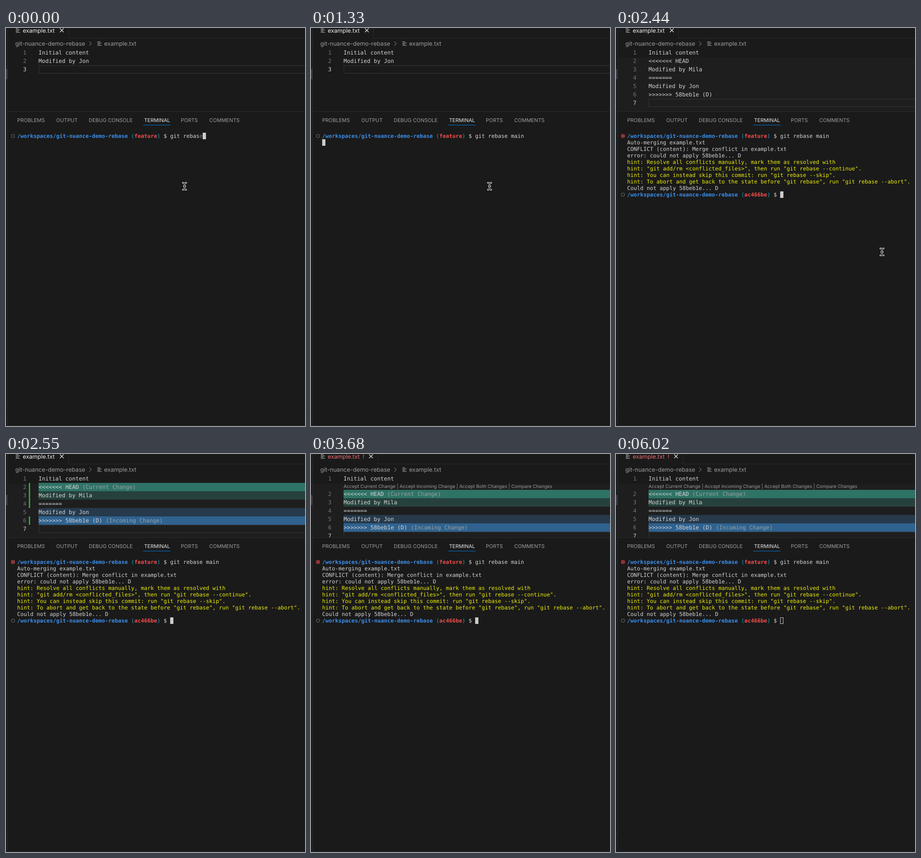
Write an HTML page with a canvas that moves like this. It is 643 px wide and 855 px high and loops after 6.25 s.

```html
<!DOCTYPE html>
<html lang="en">
<head>
<meta charset="utf-8">
<title>Rebase conflict</title>
<style>
html, body { margin: 0; width: 100%; height: 100%; overflow: hidden; background: #1a1a1a; }
canvas { display: block; }
</style>
</head>
<body>
<canvas id="stage" width="643" height="855"></canvas>
<script>
const ctx = document.getElementById('stage').getContext('2d');
const LOOP = 6250, W = 643, H = 855;
const MONO = '"DejaVu Sans Mono", monospace';
const SANS = 'Inter, sans-serif';
const TERM = '11.63px ' + MONO, TERM_BOLD = 'bold ' + TERM, CODE = '12px ' + MONO;
const COL = 7, ROW = 14, TERM_X = 24, TERM_Y = 225;
const INK = '#d4d4d4', MUTED = '#9d9d9d', EDGE = '#2b2b2b', YELLOW = '#ebeb0c', RED = '#f14c4c';

// Moments at which the screen changes, in ms
const AT = {
  enter: 1330, output: 1630, prompt: 1690, conflict: 2440,
  tint: 2550, lens: 2610, tabError: 3630, gutterClear: 3680, blur: 6020
};

// Command line: characters typed, and how many of them are confirmed by the shell
const TYPING = [
  [0, 10, 9], [90, 10, 10], [320, 11, 11], [620, 12, 11], [690, 12, 12],
  [760, 13, 12], [840, 14, 12], [910, 15, 12], [1090, 15, 15]
];
const COMMAND = 'git rebase main';

// Mouse positions; an entry without a position hides it
const MOUSE = [
  [0, 384, 340], [2260, 402, 352], [2380, 500, 426], [2440, 572, 481],
  [2500, 630, 480], [2550], [5060, 641, 851], [5120, 639, 848], [5180, 640, 852], [5240]
];

const OUTPUT = [
  'Auto-merging example.txt',
  'CONFLICT (content): Merge conflict in example.txt',
  'error: could not apply 58beb1e... D',
  'hint: Resolve all conflicts manually, mark them as resolved with',
  'hint: "git add/rm <conflicted_files>", then run "git rebase --continue".',
  'hint: You can instead skip this commit: run "git rebase --skip".',
  'hint: To abort and get back to the state before "git rebase", run "git rebase --abort".',
  'Could not apply 58beb1e... D'
];

const CLEAN = ['Initial content', 'Modified by Jon', ''];
const CONFLICT = [
  'Initial content', '<<<<<<< HEAD', 'Modified by Mila', '=======',
  'Modified by Jon', '>>>>>>> 58beb1e (D)', ''
];
const TINTS = [null, '#2f7366', '#26413c', null, '#263a4c', '#2f628f', null];
const NOTES = { 1: '(Current Change)', 5: '(Incoming Change)' };

const stepAt = (steps, t) => steps.filter(s => s[0] <= t).pop();

function rect(x, y, w, h, color) {
  ctx.fillStyle = color;
  ctx.fillRect(x, y, w, h);
}

function text(str, x, y, font, color, align = 'left') {
  ctx.font = font;
  ctx.fillStyle = color;
  ctx.textAlign = align;
  ctx.fillText(str, x, y);
}

function line(points, color, width = 1) {
  ctx.strokeStyle = color;
  ctx.lineWidth = width;
  ctx.beginPath();
  points.forEach(([x, y]) => ctx.lineTo(x, y));
  ctx.stroke();
}

function cross(x, y, r, color, width) {
  line([[x - r, y - r], [x + r, y + r]], color, width);
  line([[x - r, y + r], [x + r, y - r]], color, width);
}

function fileIcon(x, y, color) {
  [6, 9, 6, 9].forEach((w, i) => rect(x, y + i * 2.6, w, 1, color));
}

function drawTab(t) {
  const error = t >= AT.tabError;
  const edge = error ? 143 : 134;
  rect(edge, 0, 1, 22, EDGE);
  rect(edge, 21, W - edge, 1, EDGE);
  fileIcon(21, 1, '#c5c5c5');
  text('example.txt', 36, 9.5, '12.5px ' + SANS, error ? '#ee6a70' : '#f2f2f2');
  if (error) text('!', 111, 9.5, '12.5px ' + SANS, '#ee6a70');
  cross(error ? 129 : 120, 5, 4, '#e4e4e4', 1.2);
}

function drawBreadcrumb() {
  const font = '12.6px ' + SANS;
  text('git-nuance-demo-rebase', 20, 38, font, MUTED);
  line([[179, 29], [183.5, 33.5], [179, 38]], MUTED);
  fileIcon(196.5, 29, '#b5b5b5');
  text('example.txt', 211, 38, font, MUTED);
}

function drawEditor(t) {
  const conflict = t >= AT.conflict, tinted = t >= AT.tint, lens = t >= AT.lens;
  const lines = conflict ? CONFLICT : CLEAN;
  const last = lines.length - 1;

  ctx.save();
  ctx.beginPath();
  ctx.rect(4, 44, W - 4, 135);
  ctx.clip();
  if (conflict) rect(4, 64, W - 4, 115, '#1e1e1e');

  lines.forEach((str, i) => {
    const top = 44 + i * 18 + (lens && i ? 15 : 0);
    const base = top + 13;
    if (tinted && TINTS[i]) rect(70, top, W - 70, 18, TINTS[i]);
    if (tinted && t < AT.gutterClear && [1, 2, 3, 5].includes(i)) rect(49, top, 3, 18, '#2ea043');
    if (i === last) {
      ctx.strokeStyle = '#2d2d2d';
      ctx.lineWidth = 1.5;
      ctx.strokeRect(70.75, top + .75, W, 16.5);
    }
    text(i + 1, 44, base, CODE, i === last ? '#d0d0d0' : '#6e7681', 'right');
    text(str, 70, base, CODE, INK);
    if (tinted && NOTES[i]) {
      text(NOTES[i], 70 + ctx.measureText(str + ' ').width, base, CODE, '#99a3a3');
    }
  });

  if (lens) {
    text('Accept Current Change | Accept Incoming Change | Accept Both Changes | Compare Changes',
      70, 72.5, '10px ' + SANS, '#999999');
  }
  ctx.restore();
}

function drawPanelTabs() {
  const tabs = {
    PROBLEMS: 24, OUTPUT: 108, 'DEBUG CONSOLE': 178, TERMINAL: 297, PORTS: 376, COMMENTS: 437
  };
  rect(4, 179, W - 4, 1, EDGE);
  for (const [name, x] of Object.entries(tabs)) {
    text(name, x, 202, '11px ' + SANS, name === 'TERMINAL' ? '#e7e7e7' : MUTED);
  }
  rect(295, 208, 59, 1, '#0078d4');
}

function termText(str, col, row, color = INK, font = TERM) {
  text(str, TERM_X + col * COL, TERM_Y + row * ROW + 11, font, color);
}

function drawPrompt(row, branch, failed) {
  const y = TERM_Y + row * ROW + 7;
  const color = failed ? RED : '#666666';
  ctx.strokeStyle = color;
  ctx.lineWidth = 1.2;
  ctx.beginPath();
  ctx.arc(15, y, 3.5, 0, Math.PI * 2);
  ctx.stroke();
  if (failed) cross(15, y, 1.6, color, 1.2);

  termText('/workspaces/git-nuance-demo-rebase', 0, row, '#3b8eea', TERM_BOLD);
  termText('(', 35, row, '#11a8cd');
  termText(branch, 36, row, RED, TERM_BOLD);
  termText(')', 43, row, '#11a8cd');
  termText('$', 45, row);
}

function drawCursor(col, row, hollow) {
  const x = TERM_X + col * COL, y = TERM_Y + row * ROW;
  rect(x, y, COL, ROW, '#cccccc');
  if (hollow) rect(x + 1, y + 1, COL - 2, ROW - 2, '#1a1a1a');
}

function drawTerminal(t) {
  const [, typed, confirmed] = stepAt(TYPING, t);
  drawPrompt(0, 'feature', t >= AT.prompt);
  termText(COMMAND.slice(0, confirmed), 47, 0);
  termText(COMMAND.slice(confirmed, typed), 47 + confirmed, 0, '#7c7c7c');

  if (t >= AT.output) {
    OUTPUT.forEach((str, i) => termText(str, 0, i + 1, str.startsWith('hint') ? YELLOW : INK));
  }
  if (t >= AT.prompt) {
    drawPrompt(9, 'ac466be', false);
    drawCursor(47, 9, t >= AT.blur);
  } else if (t >= AT.output) {
    drawCursor(0, 9);
  } else if (t >= AT.enter) {
    drawCursor(0, 1);
  } else {
    drawCursor(47 + typed, 0);
  }
}

function drawMouse(t) {
  const [, x, y] = stepAt(MOUSE, t);
  if (x === undefined) return;
  const beam = new Path2D(
    'M-3.5 -7.5 Q0 -7.5 0 -4.5 V4.5 Q0 7.5 -3.5 7.5 ' +
    'M3.5 -7.5 Q0 -7.5 0 -4.5 M0 4.5 Q0 7.5 3.5 7.5 M-1.5 0 H1.5');
  ctx.save();
  ctx.translate(x, y);
  ctx.lineCap = 'square';
  for (const [color, width] of [['#e8e8e8', 3], ['#080808', 1.2]]) {
    ctx.strokeStyle = color;
    ctx.lineWidth = width;
    ctx.stroke(beam);
  }
  ctx.restore();
}

function drawFrame() {
  rect(0, 0, W, H, '#1a1a1a');
  rect(3, 0, 1, H, EDGE);
  rect(0, 88, 3, 22, '#3c3c40');
  rect(0, 813, 3, 1, EDGE);
  rect(0, 835, 3, 1, EDGE);
  rect(4, 854, W - 4, 1, EDGE);
}

function render() {
  const t = performance.now() % LOOP;
  drawFrame();
  drawTab(t);
  drawBreadcrumb();
  drawEditor(t);
  drawPanelTabs();
  drawTerminal(t);
  drawMouse(t);
  requestAnimationFrame(render);
}

ctx.textRendering = 'geometricPrecision';
render();
</script>
</body>
</html>
```
